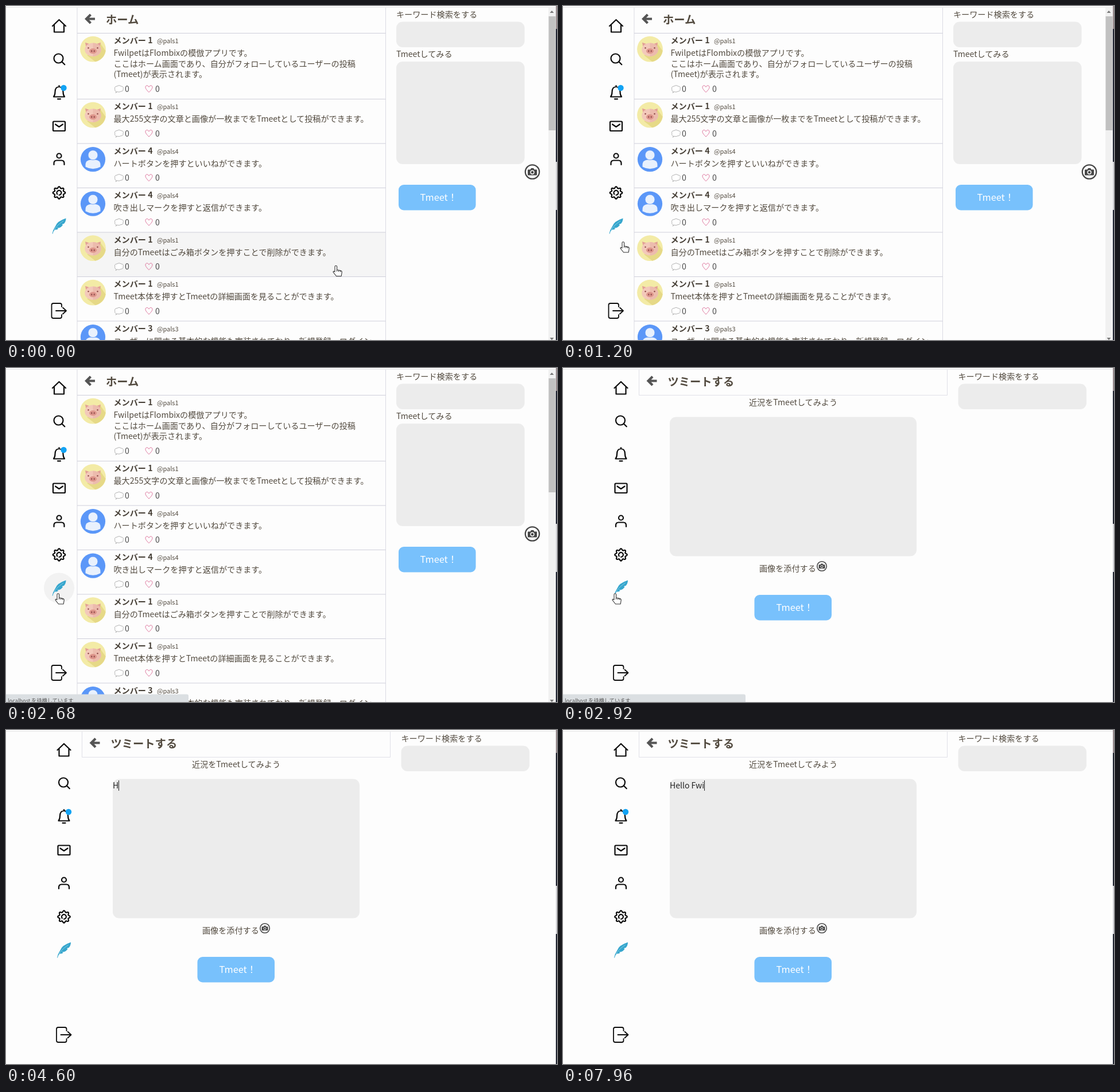
Recreate the animation shown at these times as an HTML page. Size 960 px wide and 583 px high, loop 8 s.

```html
<!DOCTYPE html>
<html lang="ja">
<head>
<meta charset="utf-8">
<title>Tmeet</title>
<style>
html, body { margin: 0; width: 100%; height: 100%; overflow: hidden; background: #fdfdfd; }
svg { display: block; width: 100vw; height: 100vh; }
text { font: 14.12px "Noto Sans CJK JP", "Noto Sans CJK", "Noto Sans", sans-serif; fill: #524a3f; white-space: pre; }
.title { font-size: 19.3px; font-weight: 600; }
.name { font-weight: 700; fill: #463f36; }
.handle { font-size: 11px; }
.count { fill: #4a4a4a; }
.button { font-size: 16.4px; fill: #fff; font-weight: 500; }
.typed { font-size: 14px; fill: #222; }
.status { font-size: 9.2px; fill: #555; }
.line { fill: none; stroke: #0b0b0b; stroke-width: 2.200; stroke-linejoin: round; stroke-linecap: round; }
.border { fill: none; stroke: #cfcfda; }
.field { fill: #ececec; }
.blue { fill: #78c1fc; }
</style>
</head>
<body>
<svg viewBox="0 0 960 583" preserveAspectRatio="none">
  <defs>
    <g id="pig">
      <circle r="22.4" fill="#f3eba6"/>
      <path d="M12-11L22 3A22.4 22.4 0 0 1 4 22L-10 11z" fill="#e6d987"/>
      <path d="M-13.500-11.500l9 3-7 8zM13.500-11.500l-9 3 7 8z" fill="#e2a096"/>
      <ellipse cy="1" rx="14.200" ry="11.800" fill="#f3c9ba"/>
      <path d="M0-10.800A14.200 11.800 0 0 1 0 12.800z" fill="#ecbbad"/>
      <ellipse cy="3.500" rx="6.500" ry="4.600" fill="#de968c"/>
      <g fill="#8d4a48">
        <circle cx="-8" cy="-2" r="1.200"/><circle cx="8" cy="-2" r="1.200"/>
        <ellipse cx="-2.200" cy="3.500" rx="1" ry="1.600"/><ellipse cx="2.200" cy="3.500" rx="1" ry="1.600"/>
      </g>
    </g>
    <g id="person">
      <circle r="21.600" fill="#5b97f8"/>
      <path d="M-13 13V9.500C-13 2.500-8 .5 0 .5S13 2.500 13 9.500V13Q0 20-13 13z" fill="#e9f1fd"/>
      <circle cy="-7.500" r="8.500" fill="#e9f1fd" stroke="#5b97f8" stroke-width=".8"/>
    </g>
    <g id="reactions">
      <path d="M3.500 5Q0 4 .8 .5Q-.5-4 4-4.500Q8-7.500 12-4.500Q16.500-4 15 .5Q15.500 4.500 11 4.500Q8 6.500 5 5L2 7z" fill="#fff" stroke="#aaa" stroke-width=".9"/>
      <path d="M60 6C56 2 54-.5 54-2.800C54-6.500 58.500-6.800 60-3.200C61.500-6.800 66-6.500 66-2.800C66-.5 64 2 60 6z" fill="none" stroke="#d9608e" stroke-width=".9"/>
      <text class="count" x="18" y="5.500">0</text>
      <text class="count" x="71" y="5.500">0</text>
    </g>
    <g id="camera">
      <circle r="12.2" fill="#fdfdfd" stroke="#464646" stroke-width="2.300"/>
      <path d="M-7-4h3.500l1.500-2.500h4L3.500-4H7q1 0 1 1V5q0 1-1 1H-7q-1 0-1-1V-3q0-1 1-1z" fill="#464646"/>
      <circle cy=".8" r="3" fill="#464646" stroke="#fdfdfd" stroke-width="1.400"/>
    </g>
    <path id="back" d="M155 22.500H141M147.500 15l-7.500 7.500 7.500 7.500" fill="none" stroke="#555" stroke-width="4.200"/>
  </defs>

  <rect width="960" height="583" fill="#fdfdfd"/>

  <g id="home">
    <rect id="rowHover" x="124" y="395" width="537" height="77" fill="#f4f4f4"/>
    <path class="border" d="M124 3V583M661.500 3V583" stroke-opacity=".75"/>
    <use href="#back"/>
    <text class="title" x="174" y="31">ホーム</text>
    <g id="posts"></g>
    <text x="680" y="19.500">キーワード検索をする</text>
    <rect class="field" x="680" y="27.500" width="223.500" height="44.500" rx="11"/>
    <text x="680" y="89">Tmeetしてみる</text>
    <rect class="field" x="680" y="97" width="223.500" height="179" rx="11"/>
    <use href="#camera" x="917" y="289.500"/>
    <rect class="blue" x="684" y="312" width="134.500" height="44.500" rx="9"/>
    <text class="button" x="721.500" y="340">Tmeet！</text>
    <rect x="945" y="3" width="13" height="580" fill="#f1f1f1"/>
    <rect x="945.500" y="18" width="12" height="199" fill="#c1c1c1"/>
    <path d="M947.500 12l3.500-4 3.500 4zM947.500 579l3.500 4 3.500-4z" fill="#777"/>
  </g>

  <g id="compose">
    <path class="border" d="M132.500 3V47.500H669.500V3" stroke-opacity=".6"/>
    <use href="#back" x="8.500"/>
    <text class="title" x="182.500" y="31">ツミートする</text>
    <text x="401" y="64.500" text-anchor="middle">近況をTmeetしてみよう</text>
    <rect class="field" x="186" y="85.500" width="430" height="243" rx="11"/>
    <text class="typed" id="typed" x="186" y="102"></text>
    <rect id="caret" y="88" width="1" height="18" fill="#222"/>
    <text x="342" y="354.500">画像を添付する</text>
    <use href="#camera" transform="translate(451 346) scale(.68)"/>
    <rect class="blue" x="333.500" y="396" width="134.500" height="44.500" rx="9"/>
    <text class="button" x="371.500" y="424">Tmeet！</text>
    <text x="688.500" y="19.500">キーワード検索をする</text>
    <rect class="field" x="688.500" y="27.500" width="223.500" height="44.500" rx="11"/>
  </g>

  <g id="nav">
    <circle id="linkHover" cx="92.500" cy="384" r="26.500" fill="#f2f2f2"/>
    <g class="line">
      <path d="M81 35L92.500 24 104 35M84 33V45.500H101V33"/>
      <circle cx="91.500" cy="91.500" r="8"/><path d="M97.500 97.500l4.800 4.800"/>
      <path d="M83 158.500q2.500-3 2.500-8.500c0-6 3-9 7-9s7 3 7 9q0 5.500 2.500 8.500zM92.500 139v2M90 162.300h5"/>
      <rect x="82" y="201.500" width="21" height="16.500" rx="1.500"/><path d="M86 206.500l6.500 4.500 6.500-4.500"/>
      <circle cx="92.500" cy="261.500" r="4"/><path d="M83.500 277v-2.500q0-5 5-5h8q5 0 5 5V277"/>
      <path id="gear"/><path d="M89.300 328.500a4 4 0 1 1 3.200 1.500"/>
      <path d="M97 525v-3q0-3-3-3H82.500q-3 0-3 3v20q0 3 3 3H94q3 0 3-3v-3M87 532h18M99 526.500l6 5.500-6 5.500" stroke-width="1.800"/>
    </g>
    <path d="M80.500 397.500Q82 390 86 384.500Q89 375.500 104.500 370.500Q104.500 376 101 380L97.500 381 99 382.500Q96 386.500 92 387.500L89.500 387 91 389Q88 391 85 390.500Q82.500 393 81.500 397.500z" fill="#36a6cd"/>
    <path d="M83.500 391Q90 381 100 375" fill="none" stroke="#a5dcec" stroke-width=".7"/>
    <circle id="dot" cx="100.500" cy="143" r="5.200" fill="#12a3f4"/>
  </g>

  <path d="M0 2.500H958" stroke="#e6e6e6"/>
  <path d="M959 0V40" stroke="#9a8d90" stroke-width="2"/>
  <path d="M959 40V272M959 356V583" stroke="#202431" stroke-width="2"/>
  <path d="M959 272V356" stroke="#d6d6da" stroke-width="2"/>

  <g id="status">
    <rect id="statusBox" x="-4" y="569.500" height="20" rx="3" fill="#dbdfe2"/>
    <text class="status" id="statusText" x="3" y="584"></text>
  </g>

  <g id="pointer" stroke="#333" stroke-width="1.100" stroke-linejoin="round" fill="#fff">
    <path id="hand" d="M-2 1.500a1.800 1.800 0 0 1 3.600 0V7l6 1.300q2.900.6 2.600 3.200l-1 6.500H.5L-5 11q.2-2.500 3-.5zM1.600 7v3M4.600 8v2.500M7.500 8.800v2"/>
    <path id="arrow" d="M0 0V15l3.500-3 2.300 5 2.300-1-2.200-4.800H11z"/>
    <path id="beam" d="M-3-8h6M0-8V8M-3 8h6" fill="none"/>
  </g>
</svg>
<script>
const $ = id => document.getElementById(id);
const LOOP = 8000, PAGE_CHANGE = 2760;

// [top, user number, ...lines]
const posts = [
  [47.5, 1, 'FwilpetはFlombixの模倣アプリです。', 'ここはホーム画面であり、自分がフォローしているユーザーの投稿', '(Tmeet)が表示されます。'],
  [162.5, 1, '最大255文字の文章と画像が一枚までをTmeetとして投稿ができます。'],
  [240, 4, 'ハートボタンを押すといいねができます。'],
  [317.5, 4, '吹き出しマークを押すと返信ができます。'],
  [395, 1, '自分のTmeetはごみ箱ボタンを押すことで削除ができます。'],
  [472.5, 1, 'Tmeet本体を押すとTmeetの詳細画面を見ることができます。'],
  [550, 3, 'ユーザーに関する基本的な機能も実装されており、新規登録、ログイン'],
];

$('posts').innerHTML = posts.map(([top, user, ...lines]) => `
  <path class="border" d="M124 ${top}H661.5"/>
  <use href="#${user === 1 ? 'pig' : 'person'}" x="151.5" y="${top + 27.7}"/>
  <text class="name" x="187.5" y="${top + 17.7}">メンバー ${user}</text>
  <text class="handle" x="263" y="${top + 17.5}">@pals${user}</text>
  ${lines.map((line, i) => `<text x="187.5" y="${top + 39.8 + i * 18.5}">${line}</text>`).join('')}
  <use href="#reactions" x="189" y="${top + 59.7 + (lines.length - 1) * 18.7}"/>`).join('');

$('gear').setAttribute('d', 'M' + Array.from({ length: 64 }, (_, i) => {
  const a = i * Math.PI / 32, r = 9.4 + 1.4 * Math.cos(8 * a);
  return `${(92.5 + r * Math.cos(a)).toFixed(2)} ${(326 + r * Math.sin(a)).toFixed(2)}`;
}).join('L') + 'z');

// [time, x, y] of the pointer's hot spot
const track = [
  [0, 575.5, 453.5], [560, 277.5, 454], [860, 175, 448], [1200, 105, 412], [1600, 91, 394],
  [3220, 91, 394], [3480, 305, 350], [3700, 375, 222], [3840, 380, 230], [4110, 380, 230], [4300, 389, 239], [8000, 389, 239],
];
const typing = [
  [0, ''], [4600, 'H'], [5120, 'He'], [5600, 'Hel'], [5760, 'Hell'], [6120, 'Hello'], [6160, 'Hello '],
  [6800, 'Hello f'], [7400, 'Hello '], [7480, 'Hello F'], [7640, 'Hello Fw'], [7960, 'Hello Fwi'],
];
const statuses = [
  [0, 0, ''], [1800, 147, 'localhost:8000/create_tmeet/'],
  [2440, 318, 'localhost を待機しています'], [3400, 0, ''],
];

const clamp = v => Math.max(0, Math.min(1, v));
const latest = (steps, t) => steps.filter(s => s[0] <= t).pop();
const show = (id, on) => { $(id).style.display = on ? '' : 'none'; };

function pointerAt(t) {
  const i = track.findIndex(k => k[0] > t);
  const [t0, x0, y0] = track[i - 1], [t1, x1, y1] = track[i];
  const p = (t - t0) / (t1 - t0);
  return [x0 + (x1 - x0) * p, y0 + (y1 - y0) * p];
}

function draw(t) {
  const composing = t >= PAGE_CHANGE;
  show('home', !composing);
  show('compose', composing);
  $('nav').setAttribute('transform', `translate(${composing ? 8.5 : 0} 0)`);
  show('dot', !composing || t >= 2960);

  $('rowHover').style.opacity = clamp(.75 + t / 350) * clamp((1200 - t) / 200);
  $('linkHover').style.opacity = composing ? 0 : clamp((t - 1200) / 300);

  const [, width, label] = latest(statuses, t);
  show('status', width);
  $('statusBox').setAttribute('width', width + 4);
  $('statusText').textContent = label;

  const text = latest(typing, t)[1];
  $('typed').textContent = text;
  if (composing) {
    const advance = text ? $('typed').getComputedTextLength() : 0;
    $('caret').setAttribute('x', Math.round(186 + advance));
  }
  show('caret', t >= 4120);

  const [x, y] = pointerAt(t);
  $('pointer').setAttribute('transform', `translate(${x.toFixed(1)} ${y.toFixed(1)})`);
  show('hand', t < 3240);
  show('arrow', t >= 3240 && t < 3480);
  show('beam', t >= 3720 && t < 4600);
}

function frame() {
  draw(performance.now() % LOOP);
  requestAnimationFrame(frame);
}
frame();
</script>
</body>
</html>
```
